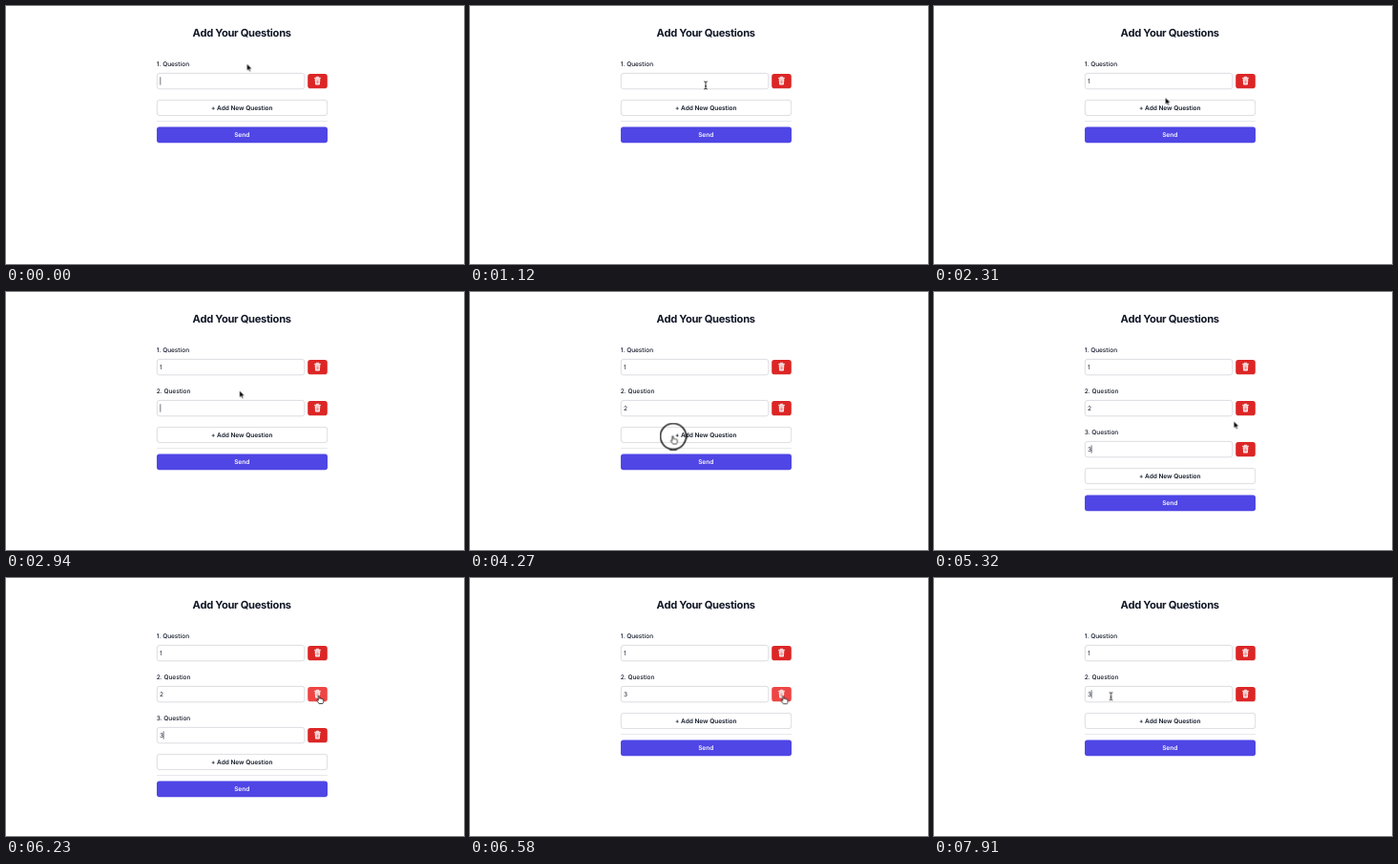
An HTML page for the animation above (8 s loop, 480x270 px).

```html
<!DOCTYPE html>
<html lang="en">
<head>
<meta charset="utf-8">
<title>Add Your Questions</title>
<style>
html, body { margin: 0; width: 100%; height: 100%; overflow: hidden; background: #fff; }
svg { display: block; width: 480px; height: 270px; }
text { font: 500 6.5px Inter, sans-serif; fill: #111827; text-rendering: geometricPrecision; }
.title { font-size: 11.15px; font-weight: 700; letter-spacing: -.025em; }
.btn { font-weight: 600; }
.val { font-weight: 400; }
.mid { text-anchor: middle; }
.box { fill: #fff; stroke: #d3d5da; stroke-width: .8; }
.rows { color: #dc2626; }

/* 1% of the loop is 80 ms */
.a { animation: 8s step-end infinite; }
.row2 { animation-name: row2; }
.row3 { animation-name: row3; }
.foot { animation-name: foot; }
.one { animation-name: one; }
.two { animation-name: two; }
.moved { animation-name: moved; }
.three { animation-name: three; }
.hover { animation-name: hover; }
.caret { animation-name: caret; }
.cursor { animation: cursor 8s linear infinite; }
.arrow { animation-name: arrow; }
.beam { animation-name: beam; }
.hand { animation-name: hand; }
.ring { animation-name: ring; }

@keyframes row2 { 0% { opacity: 0 } 36.75%, 100% { opacity: 1 } }
@keyframes row3 { 0% { opacity: 0 } 54.25% { opacity: 1 } 82.25%, 100% { opacity: 0 } }
@keyframes foot {
  0% { transform: translateY(0) }
  36.75% { transform: translateY(43px) }
  54.25% { transform: translateY(86px) }
  82.25%, 100% { transform: translateY(43px) }
}
@keyframes one { 0% { opacity: 0 } 20.125%, 100% { opacity: 1 } }
@keyframes two { 0% { opacity: 0 } 43.75% { opacity: 1 } 82.25%, 100% { opacity: 0 } }
@keyframes moved { 0% { opacity: 0 } 82.25%, 100% { opacity: 1 } }
@keyframes three { 0% { opacity: 0 } 62.125%, 100% { opacity: 1 } }
@keyframes hover { 0% { color: #dc2626 } 70% { color: #ef4444 } 83.125%, 100% { color: #dc2626 } }

@keyframes caret {
  0% { opacity: 1; transform: translate(161.3px, 74.3px) }
  13.125% { opacity: 0; transform: translate(161.3px, 74.3px) }
  20.125% { opacity: 1; transform: translate(163.7px, 74.3px) }
  26.25% { opacity: 0; transform: translate(163.7px, 74.3px) }
  32.375% { opacity: 1; transform: translate(163.7px, 74.3px) }
  36.75% { opacity: 1; transform: translate(161.3px, 117.3px) }
  43% { opacity: 0; transform: translate(161.3px, 117.3px) }
  43.75% { opacity: 1; transform: translate(164.8px, 117.3px) }
  50% { opacity: 0; transform: translate(164.8px, 117.3px) }
  54.25% { opacity: 1; transform: translate(161.3px, 160.3px) }
  60.5% { opacity: 0; transform: translate(161.3px, 160.3px) }
  62.125% { opacity: 1; transform: translate(164.6px, 160.3px) }
  68.25% { opacity: 0; transform: translate(164.6px, 160.3px) }
  74.375% { opacity: 1; transform: translate(164.6px, 160.3px) }
  80.625% { opacity: 0; transform: translate(164.6px, 117.3px) }
  96.25%, 100% { opacity: 1; transform: translate(164.6px, 117.3px) }
}

@keyframes cursor {
  0% { transform: translate(252.5px, 60.5px) }
  7% { transform: translate(252.5px, 60.5px); animation-timing-function: steps(6, start) }
  12.25% { transform: translate(247px, 83px) }
  26.25% { transform: translate(247px, 83px); animation-timing-function: steps(4, start) }
  29.75% { transform: translate(242.5px, 95.8px) }
  31.5% { transform: translate(242.5px, 95.8px); animation-timing-function: steps(3, start) }
  34.125% { transform: translate(244.7px, 103.2px) }
  48.125% { transform: translate(244.7px, 103.2px); animation-timing-function: steps(5, start) }
  52.5% { transform: translate(212.5px, 150.5px) }
  63.875% { transform: translate(212.5px, 150.5px); animation-timing-function: steps(4, start) }
  67.375% { transform: translate(314.3px, 135.3px) }
  67.38% { transform: translate(314.3px, 135.3px); animation-timing-function: steps(7, start) }
  73.5% { transform: translate(327.5px, 122.8px) }
  77.875% { transform: translate(327.5px, 122.8px); animation-timing-function: steps(2, start) }
  79.625% { transform: translate(328.3px, 123.2px) }
  83.125% { transform: translate(328.3px, 123.2px); animation-timing-function: steps(9, start) }
  91%, 100% { transform: translate(185.5px, 123.7px) }
}
@keyframes arrow {
  0% { opacity: 1 } 8.75% { opacity: 0 } 27.125% { opacity: 1 } 31.5% { opacity: 0 }
  36.75% { opacity: 1 } 49% { opacity: 0 } 49.875% { opacity: 1 } 50.75% { opacity: 0 }
  54.25% { opacity: 1 } 70%, 100% { opacity: 0 }
}
@keyframes beam {
  0% { opacity: 0 } 8.75% { opacity: 1 } 27.125% { opacity: 0 }
  49% { opacity: 1 } 49.875% { opacity: 0 } 83.125%, 100% { opacity: 1 }
}
@keyframes hand {
  0% { opacity: 0 } 31.5% { opacity: 1 } 36.75% { opacity: 0 } 50.75% { opacity: 1 }
  54.25% { opacity: 0 } 70% { opacity: 1 } 83.125%, 100% { opacity: 0 }
}
@keyframes ring {
  0% { opacity: 0; r: 11px }
  35.875% { opacity: 1; r: 11px }
  36.75% { opacity: 0; r: 11px }
  53.375% { opacity: 1; r: 13.5px }
  54.25% { opacity: 0; r: 13.5px }
  81.375% { opacity: 1; r: 7.5px }
  82.25% { opacity: 0; r: 7.5px }
  96.25% { opacity: 1; r: 7.5px }
  97.125%, 100% { opacity: 0; r: 7.5px }
}
</style>
</head>
<body>
<svg viewBox="0 0 480 270">
  <defs>
    <g id="row">
      <rect class="box" x="158.3" y="70.4" width="154.5" height="16.4" rx="2.6"/>
      <rect x="316.2" y="71" width="20.6" height="15.2" rx="2.8" fill="currentColor"/>
      <path d="M323.1 75.4h6.8M325.2 75.2v-.9h2.6v.9" fill="none" stroke="#fff" stroke-width=".9"/>
      <path d="M323.7 76.3h5.6l-.35 5.4q-.05.8-.8.8h-3.3q-.75 0-.8-.8z" fill="#fff"/>
      <path d="M325.2 77.4v4M326.5 77.4v4M327.8 77.4v4" stroke="currentColor" stroke-width=".5"/>
    </g>
  </defs>

  <text class="title mid" x="247.2" y="32.1">Add Your Questions</text>

  <g class="rows">
    <g>
      <text x="157.8" y="63.3">1. Question</text>
      <use href="#row"/>
      <text class="val a one" x="161" y="81">1</text>
    </g>
    <g transform="translate(0 43)"><g class="a row2">
      <text x="157.8" y="63.3">2. Question</text>
      <use class="a hover" href="#row"/>
      <text class="val a two" x="161" y="81">2</text>
      <text class="val a moved" x="161" y="81">3</text>
    </g></g>
    <g transform="translate(0 86)"><g class="a row3">
      <text x="157.8" y="63.3">3. Question</text>
      <use href="#row"/>
      <text class="val a three" x="161" y="81">3</text>
    </g></g>
  </g>

  <g class="a foot">
    <rect class="box" x="158.3" y="98.4" width="178.4" height="16.2" rx="2.6"/>
    <text class="btn mid" x="247.3" y="108.9">+ Add New Question</text>
    <rect x="158" y="120.4" width="179" height=".7" fill="#d9dbe0"/>
    <rect x="158" y="126.5" width="179" height="16.8" rx="2.8" fill="#4f46e5"/>
    <text class="btn mid" x="247.2" y="137.2" style="fill:#fff">Send</text>
  </g>

  <rect class="a caret" width=".6" height="8.4" fill="#111827"/>

  <g class="cursor">
    <path class="a arrow" d="M0 0V7.2L1.7 5.7 2.8 8.2 4 7.7 2.9 5.3H5.2Z" fill="#000" stroke="#fff" stroke-width=".5"/>
    <path class="a beam" d="M-1.8-4Q0-4 0-3Q0-4 1.8-4M0-3V3M-1.8 4Q0 4 0 3Q0 4 1.8 4M-.9 1H.9" fill="none" stroke="#000" stroke-width=".8"/>
    <path class="a hand" d="M-.7 .6Q0-.4.7.6V3.2Q1.5 2.6 2.1 3.4 2.9 2.9 3.5 3.7 4.8 3.4 4.8 4.7V6.2Q4.7 7.2 4 8.5H.1Q-1 6.9-2.2 5.3-2.2 4.3-.7 5.2Z" fill="#fff" stroke="#000" stroke-width=".7" stroke-linejoin="round"/>
    <circle class="a ring" cx=".5" cy=".6" r="11" fill="none" stroke="#000" stroke-width="1.4"/>
  </g>
</svg>
</body>
</html>
```
